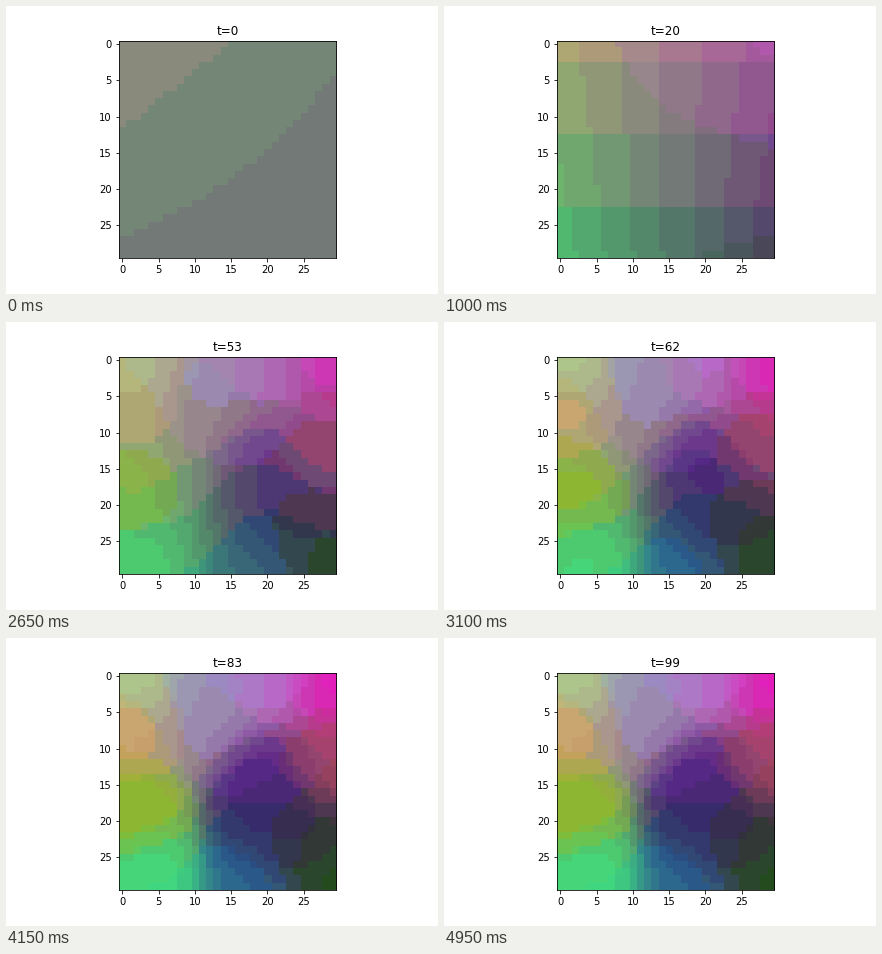
A matplotlib script for the animation above (5 s loop, 432 by 288 pixels).

```python
import numpy as np
import matplotlib.pyplot as plt
from matplotlib.animation import FuncAnimation
from matplotlib.colors import to_rgb

SIZE, STEPS = 30, 100
plt.rcParams["font.family"] = "DejaVu Sans"

# Cells that win a colour, and the colour each one learns
WINNERS = [
    (2, 1, "#9fdc96"), (11, 1, "#9092cc"), (20, 1, "#b874d4"),
    (29, 1, "#ee10be"), (1, 7, "#e69660"), (11, 7, "#9c86ae"),
    (28, 11, "#a84658"), (19, 14, "#4e148e"), (2, 18, "#94b81e"),
    (19, 21, "#26246c"), (24, 22, "#30282c"), (5, 28, "#3ee083"),
    (17, 28, "#2266a5"), (29, 28, "#1c5212"),
]
REACH = 3.8

yy, xx = np.mgrid[:SIZE, :SIZE]
u, v = (2 * axis / (SIZE - 1) - 1 for axis in (xx, yy))


def ramp(red, green, blue):
    return np.stack(np.broadcast_arrays(red, green, blue), -1)


# Nearly grey at first; later red fades downwards and green to the right
start = ramp(123 - 4 * u - 5 * v, 129.5 - 4 * u - 5 * v + 1.5 * u * v, 122 + 0 * u)
spread = ramp(122 - 47 * v, 126 - 49 * u - 9 * u * v,
              120 + 7 * u - 20 * v - 18 * u * v)
grey = spread.mean((0, 1))

pull = np.stack([np.exp(-((xx - x) ** 2 + (yy - y) ** 2) / (2 * REACH ** 2))
                 for x, y, _ in WINNERS], -1)
learned = pull @ np.array([to_rgb(c) for *_, c in WINNERS]) * 255
total = pull.sum(-1, keepdims=True)


def colour_map(t):
    if t < 20:
        return spread + (start - spread) * (1 - t / 20) ** 1.5
    gain = 1 + 0.15 * min((t - 20) / 17, 1)
    base = grey + gain * (spread - grey)
    strength = 8 * np.clip((t - 37) / 46, 0, 1) ** 2
    return (base + strength * learned) / (1 + strength * total)


def banded(maps):
    """Give all colours of one RGB cell their common mean."""
    flat = np.clip(maps, 0, 255).reshape(-1, 3)
    cells = (flat // (32, 16, 32)).astype(int) @ (256, 16, 1)
    _, idx = np.unique(cells, return_inverse=True)
    idx = idx.ravel()
    count = np.bincount(idx)
    mean = np.stack([np.bincount(idx, c) / count for c in flat.T], 1)
    return np.rint(mean[idx]).astype(np.uint8).reshape(maps.shape)


maps = banded(np.array([colour_map(t) for t in range(STEPS)]))

fig, ax = plt.subplots(figsize=(6, 4), dpi=72)
fig.subplots_adjust(left=0.125, right=0.9, bottom=0.125, top=0.88)
image = ax.imshow(maps[0], interpolation="nearest")
title = ax.set_title("t=0", fontsize=12)
ax.set_xticks(range(0, SIZE, 5))
ax.set_yticks(range(0, SIZE, 5))


def update(t):
    image.set_data(maps[t])
    title.set_text(f"t={t}")
    return image, title


anim = FuncAnimation(fig, update, frames=STEPS, interval=50,
                     repeat=True, repeat_delay=0)
plt.show()
```
